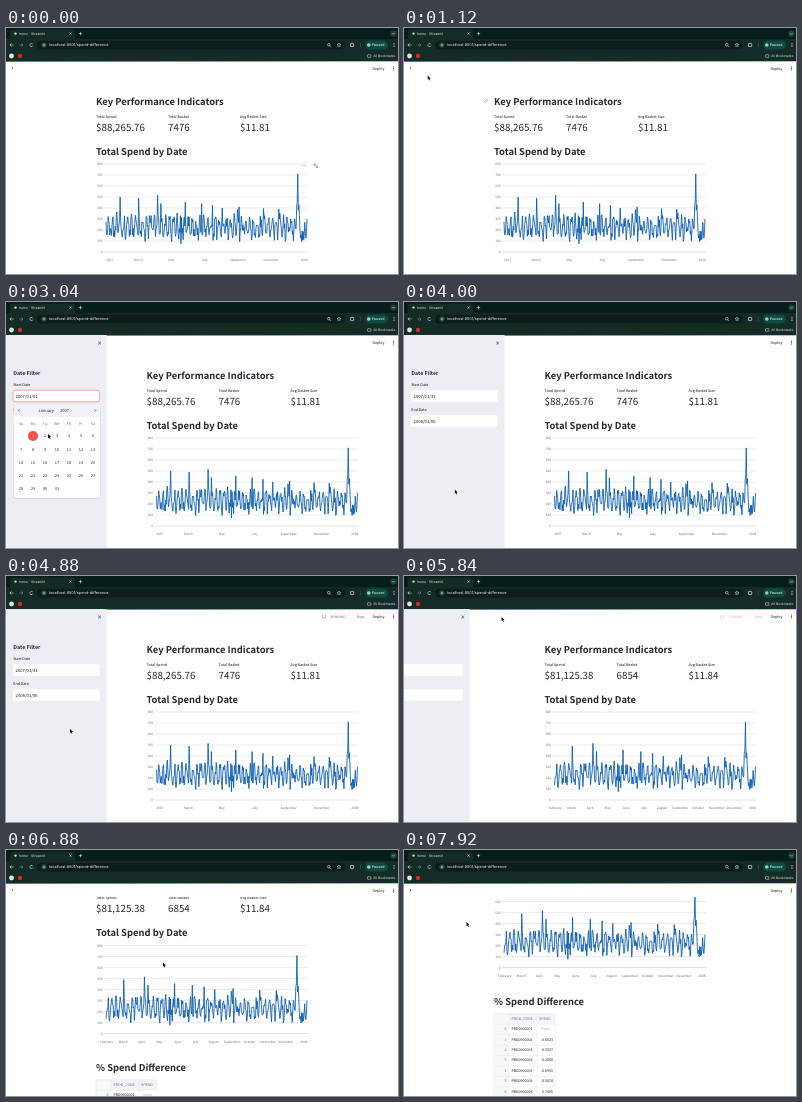
An HTML page with a canvas that plays this animation: 392 by 246 pixels, repeating every 8000 ms.

```html
<!DOCTYPE html>
<html lang="en">
<head>
<meta charset="utf-8">
<title>Spend dashboard</title>
<style>
html, body { margin: 0; width: 100%; height: 100%; overflow: hidden; background: #fff; }
canvas { display: block; width: 100vw; height: 100vh; }
</style>
</head>
<body>
<canvas id="stage"></canvas>
<script>
const W = 392, H = 246, LOOP = 8000;
const canvas = document.getElementById('stage');
const ctx = canvas.getContext('2d');
const SANS = '"Noto Sans CJK JP", "Noto Sans CJK SC", "Noto Sans CJK", "Source Sans Pro", sans-serif';
const UI = 'Inter, Roboto, sans-serif';
const INK = '#262830', LABEL = '#14151b', GREY = '#686c7c', LINE = '#0859ae';

// Moments of the story, in ms
const OPEN = 1460, CALENDAR = 2640, PICK = 3860, RUNNING = 4240, RELOAD = 5600, CLOSE = 5700;
const SIDEBAR = 100.6, SHIFT = 50.5, SCROLL = 106.5;

const clamp = v => Math.max(0, Math.min(1, v));
const span = (t, a, b) => clamp((t - a) / (b - a));
const smooth = p => p * p * (3 - 2 * p);
const easeOut = p => 1 - (1 - p) ** 3;

// [time, x, y] of the pointer tip
const pointerPath = [
  [0, 308, 135.5], [560, 308, 135.5], [840, 138, 78], [1120, 23.7, 47.5], [1360, 6, 39],
  [1520, 6, 39], [2160, 38, 100], [2360, 36, 94], [2720, 36, 94], [3040, 42, 132],
  [3520, 50.8, 187.5], [4080, 50.8, 187.5], [4600, 54, 192], [5440, 92, 42],
  [5720, 93, 41], [5840, 97.5, 41], [6400, 148, 96], [6640, 157, 112.5],
  [7400, 157, 112.5], [7840, 62.5, 72], [8000, 62.5, 72]
];

function pointerAt(t) {
  const i = Math.max(1, pointerPath.findIndex(k => k[0] >= t));
  const [t0, x0, y0] = pointerPath[i - 1], [t1, x1, y1] = pointerPath[i];
  const p = smooth(span(t, t0, t1));
  return [x0 + (x1 - x0) * p, y0 + (y1 - y0) * p];
}

// Daily spend, 1 Jan 2007 to 6 Jan 2008: a weekly swing with noise and a few peaks
function makeSpend() {
  let seed = 2007;
  const rand = () => (seed = (seed * 16807) % 2147483647) / 2147483647;
  const days = Array.from({ length: 371 }, (_, d) => {
    const week = 68 * Math.cos(2 * Math.PI * (d - 5) / 7);
    const spike = rand() > 0.93 ? 90 * rand() : 0;
    return 222 + week + (rand() - 0.5) * 135 + spike;
  });
  const peaks = { 26: 500, 60: 490, 95: 515, 101: 440, 138: 75, 146: 455, 176: 440,
    196: 425, 214: 400, 245: 410, 268: 110, 290: 395, 318: 390, 351: 420, 352: 450, 353: 710,
    354: 380, 355: 430, 356: 330 };
  for (const d in peaks) days[d] = peaks[d];
  for (let d = 357; d < 371; d++) days[d] = 85 + 70 * (d % 2) + 50 * rand();
  days[366] = 270;
  days[370] = 300;
  return days;
}
const spend = makeSpend();

// Type is set large and scaled down, so small sizes keep true letter spacing
function text(s, x, y, size, color = INK, opt = {}) {
  ctx.save();
  ctx.translate(x, y);
  ctx.scale(0.1, 0.1);
  ctx.textRendering = 'geometricPrecision';
  ctx.font = `${opt.weight || 400} ${size * 10}px ${opt.font || SANS}`;
  ctx.textAlign = opt.align || 'left';
  ctx.fillStyle = color;
  ctx.fillText(s, 0, 0);
  ctx.restore();
}
function rect(x, y, w, h, fill, r = 0) {
  ctx.fillStyle = fill;
  ctx.beginPath();
  ctx.roundRect(x, y, w, h, r);
  ctx.fill();
}
function outline(x, y, w, h, color, r = 0, width = 0.5) {
  ctx.strokeStyle = color;
  ctx.lineWidth = width;
  ctx.beginPath();
  ctx.roundRect(x, y, w, h, r);
  ctx.stroke();
}
function dot(x, y, r, fill) {
  ctx.fillStyle = fill;
  ctx.beginPath();
  ctx.arc(x, y, r, 0, 7);
  ctx.fill();
}
function ring(x, y, r, color, from = 0, to = 7) {
  ctx.strokeStyle = color;
  ctx.lineWidth = 0.6;
  ctx.beginPath();
  ctx.arc(x, y, r, from, to);
  ctx.stroke();
}
function path(points, color, width = 0.6) {
  ctx.strokeStyle = color;
  ctx.lineWidth = width;
  ctx.beginPath();
  points.forEach(([x, y]) => ctx.lineTo(x, y));
  ctx.stroke();
}
function cross(x, y, r, color) {
  path([[x - r, y - r], [x + r, y + r]], color);
  path([[x - r, y + r], [x + r, y - r]], color);
}
function kebab(x, y, color) {
  for (const dy of [-1.5, 0, 1.5]) dot(x, y + dy, 0.5, color);
}

function drawBrowser() {
  const pale = '#dbe6e2', dim = '#7f938b', bar = '#152b27';
  rect(0, 0, W, 12, '#071d19');
  rect(4, 1.5, 65, 12, bar, 2.5);
  rect(0, 11, W, 22, bar);
  dot(9.5, 5.6, 1.2, '#d5d9d8');
  text('home · Streamlit', 13, 6.9, 3.4, pale, { font: UI });
  cross(64.5, 5.6, 1.1, pale);
  path([[72.8, 5.6], [76.2, 5.6]], pale);
  path([[74.5, 3.9], [74.5, 7.3]], pale);
  dot(387.5, 5.6, 3.2, '#23403a');
  path([[386.3, 5.1], [387.5, 6.3], [388.7, 5.1]], pale);

  path([[7.5, 17], [3.9, 17], [5.5, 15.4]], pale);
  path([[3.9, 17], [5.5, 18.6]], pale);
  path([[13.5, 17], [17, 17], [15.4, 15.4]], dim);
  path([[17, 17], [15.4, 18.6]], dim);
  ring(25.5, 17, 1.6, pale, 0.4, 5.6);
  rect(31, 12.8, 308, 8.6, '#0d1d1a', 4.3);
  dot(38, 17, 2.8, '#23403a');
  ring(38, 17, 1, pale);
  text('localhost:8501/spend-difference', 43, 18.4, 3.87, '#eef4f1', { font: UI });
  ring(322.8, 16.7, 1.3, pale);
  path([[323.8, 17.7], [325, 18.9]], pale);
  path(Array.from({ length: 11 }, (_, i) => {
    const a = i * Math.PI / 5 - Math.PI / 2, r = i % 2 ? 0.9 : 2;
    return [333 + r * Math.cos(a), 17 + r * Math.sin(a)];
  }), pale, 0.5);
  outline(344.5, 15.4, 3.2, 3.2, pale, 0.5, 0.7);
  path([[354.5, 14.8], [354.5, 19.2]], '#45655b', 0.5);
  rect(359, 12.6, 23, 8.8, '#0d4c41', 4.4);
  dot(362.8, 17, 1.8, '#a9cabb');
  text('Paused', 365.8, 18.3, 3.6, '#f0faf5', { font: UI });
  kebab(388, 17, pale);

  dot(5.5, 28, 2.4, '#dfe9e2');
  dot(14, 28, 2.2, '#d82a25');
  outline(361.5, 26.7, 3.4, 2.6, pale, 0.4);
  text('All Bookmarks', 367.2, 29.2, 3.3, pale, { font: UI });
}

function drawChart(late) {
  const first = late ? 30 : 0, left = 100, bottom = 224;
  const step = 201 / (370 - first);
  const px = d => left + (d - first) * step;
  const py = v => bottom - v * 0.11;
  for (let v = 0; v <= 800; v += 100) {
    path([[98, py(v)], [302, py(v)]], v ? '#dcdfe6' : '#cdd0d8', 0.6);
    text(v, 96.5, py(v) + 1.2, 3.2, GREY, { align: 'right' });
  }
  ctx.lineJoin = 'round';
  path(spend.slice(first).map((v, i) => [px(first + i), py(v)]), LINE, 0.85);
  ctx.lineJoin = 'miter';

  for (let m = 0; m <= 12; m += late ? 1 : 2) {
    const date = new Date(Date.UTC(2007, m, 1));
    const day = (date - Date.UTC(2007, 0, 1)) / 864e5;
    if (day < first) continue;
    const name = m % 12 ? date.toLocaleString('en', { month: 'long', timeZone: 'UTC' })
                        : String(date.getUTCFullYear());
    const flush = !late && m === 0;
    text(name, px(day), 233.2, 3.15, GREY, { align: flush ? 'left' : 'center' });
  }
}

function drawTable() {
  const top = 270.3, row = 10.45, right = 151;
  const values = ['None', '-0.0623', '-0.7837', '-0.2888', '-0.6955', '-0.5874', '0.7406', '-0.3152'];
  const edge = '#dfe1e7', size = 3.6;
  const bottom = top + row * 9;
  rect(90, top, right - 90, row, '#f3f4f8');
  rect(90, top, 15, bottom - top, '#f7f8fa');
  text('PROD_CODE', 107.5, top + 6.4, size, GREY);
  text('SPEND', 135, top + 6.4, size, GREY);
  values.forEach((value, i) => {
    const y = top + row * (i + 1);
    const base = y + 5.8;
    path([[90, y], [right, y]], edge, 0.4);
    text(i, 102.5, base, size, GREY, { align: 'right' });
    text('PRD090000' + (i < 6 ? i + 1 : i + 2), 107.5, base, size, LABEL);
    const none = value === 'None';
    text(value, none ? 146 : 149, base, size, none ? '#a9acb8' : LABEL, { align: 'right' });
  });
  for (const x of [105, 133]) path([[x, top], [x, bottom]], edge, 0.4);
  outline(90, top, right - 90, bottom - top, edge, 1.2);
}

function drawPage(t) {
  const late = t >= RELOAD;
  const wide = t < OPEN + 80 || t >= CLOSE + 260;
  ctx.save();
  ctx.translate(wide ? 0 : SHIFT, -SCROLL * smooth(span(t, 6600, 7270)));
  const title = (s, y) => text(s, 90, y, 9.4, INK, { weight: 700 });
  title('Key Performance Indicators', 77);
  if (t > 800 && t < 1240) {
    ctx.save();
    ctx.translate(82, 73);
    ctx.rotate(-0.8);
    outline(-2.2, -0.8, 2.4, 1.6, '#9da0ab', 0.8);
    outline(-0.2, -0.8, 2.4, 1.6, '#9da0ab', 0.8);
    ctx.restore();
  }
  const metrics = [
    [90, 'Total Spend', late ? '$81,125.38' : '$88,265.76'],
    [162, 'Total Basket', late ? '6854' : '7476'],
    [234, 'Avg Basket Size', late ? '$11.84' : '$11.81']
  ];
  for (const [x, label, value] of metrics) {
    text(label, x, 89.5, 3.7, LABEL);
    text(value, x, 102.6, 9.8);
  }
  title('Total Spend by Date', 126.6);
  drawChart(late);
  if (t < 640) {
    for (const x of [296.4, 298, 299.6]) dot(x, 137.5, 0.45, GREY);
    path([[308.2, 138], [308.2, 136.2], [310, 136.2]], GREY);
    path([[308.2, 136.2], [311.4, 139.4]], GREY);
    path([[311.4, 137.6], [311.4, 139.4], [309.6, 139.4]], GREY);
  }
  title('% Spend Difference', 261.6);
  drawTable();
  ctx.restore();
}

function drawHeader(t) {
  rect(0, 33, W, 14, '#fff');
  const glow = ctx.createLinearGradient(0, 0, W, 0);
  glow.addColorStop(0, '#dc4335');
  glow.addColorStop(0.6, '#e08a42');
  glow.addColorStop(1, '#d8c264');
  rect(0, 33, W, 1, glow);
  path([[5.8, 38.9], [7, 40.1], [5.8, 41.3]], INK, 0.6);
  const busy = span(t, RUNNING, RUNNING + 200) * (1 - span(t, 5680, 5960));
  if (busy > 0) {
    ctx.globalAlpha = busy;
    const spin = t / 160;
    ring(318, 40.4, 1.7, GREY, spin, spin + 5);
    text('RUNNING...', 324.5, 41.7, 3.3, GREY);
    text('Stop', 350.5, 41.8, 3.7, GREY);
    ctx.globalAlpha = 1;
  }
  text('Deploy', 366.4, 41.8, 3.7, LABEL);
  kebab(387.6, 40.5, LABEL);
}

function drawCalendar() {
  const x = 8, y = 102, cell = 12;
  rect(x - 0.6, y - 0.2, 87.2, 95.2, '#d9dbe2', 2);
  rect(x, y, 86, 94, '#fff', 2);
  rect(x, y, 86, 13, '#f0f2f6', 2);
  path([[13.5, 107.2], [12.2, 108.5], [13.5, 109.8]], INK);
  path([[88.5, 107.2], [89.8, 108.5], [88.5, 109.8]], INK);
  text('January', 48, y + 8, 4.1, INK, { align: 'right' });
  text('2007', 54, y + 8, 4.1);
  const center = col => x + 7 + cell * col;
  ['Su', 'Mo', 'Tu', 'We', 'Th', 'Fr', 'Sa'].forEach((day, i) =>
    text(day, center(i), 122.5, 3.7, GREY, { align: 'center' }));
  dot(center(1), 134, 5, '#ff4b4b');
  for (let d = 1; d <= 31; d++) {
    const col = d % 7, row = Math.floor(d / 7);
    text(d, center(col), 135.4 + row * 13.2, 3.9, d === 1 ? '#fff' : INK, { align: 'center' });
  }
}

function drawSidebar(t) {
  const shown = easeOut(span(t, OPEN, OPEN + 480));
  const hidden = span(t, CLOSE, CLOSE + 300);
  const x = SIDEBAR * (shown - 1) - SIDEBAR * (hidden * 0.4 + hidden * hidden * 0.6) * 1.08;
  if (x <= -SIDEBAR) return;
  const picking = t >= CALENDAR && t < PICK;
  ctx.save();
  ctx.translate(x, 0);
  rect(0, 33, SIDEBAR, H, '#eceef4');
  cross(93.6, 41, 1.4, INK);
  text('Date Filter', 7.2, 73, 5.3, INK, { weight: 700 });
  const field = (label, value, y, active) => {
    text(label, 7.2, y - 4, 3.7, LABEL);
    rect(7, y, 86.6, 11.6, '#fff', 2);
    if (active) outline(7, y, 86.6, 11.6, '#ff4b4b', 2);
    text(value, 9.6, y + 7.3, 4.2, LABEL);
  };
  field('Start Date', t < PICK ? '2007/01/01' : '2007/01/31', 88.2, picking);
  field('End Date', '2008/01/06', 113.2, false);
  if (picking) drawCalendar();
  ctx.restore();
}

function drawPointer(t) {
  if (t < 560) return;
  const [x, y] = pointerAt(t);
  ctx.save();
  ctx.translate(x, y);
  ctx.beginPath();
  for (const [a, b] of [[0, 0], [0, 4.3], [1, 3.4], [1.7, 5], [2.4, 4.7], [1.7, 3.1], [3.1, 3]]) ctx.lineTo(a, b);
  ctx.closePath();
  ctx.strokeStyle = '#fff';
  ctx.lineWidth = 0.8;
  ctx.stroke();
  ctx.fillStyle = '#111';
  ctx.fill();
  ctx.restore();
}

function frame(now) {
  const t = now % LOOP;
  const dpr = window.devicePixelRatio || 1;
  const w = Math.round(innerWidth * dpr), h = Math.round(innerHeight * dpr);
  if (canvas.width !== w || canvas.height !== h) {
    canvas.width = w;
    canvas.height = h;
  }
  ctx.setTransform(w / W, 0, 0, h / H, 0, 0);
  rect(0, 0, W, H, '#fff');
  drawPage(t);
  drawHeader(t);
  drawSidebar(t);
  drawBrowser();
  drawPointer(t);
}

const start = performance.now();
function loop() {
  frame(performance.now() - start);
  requestAnimationFrame(loop);
}
loop();
</script>
</body>
</html>
```
